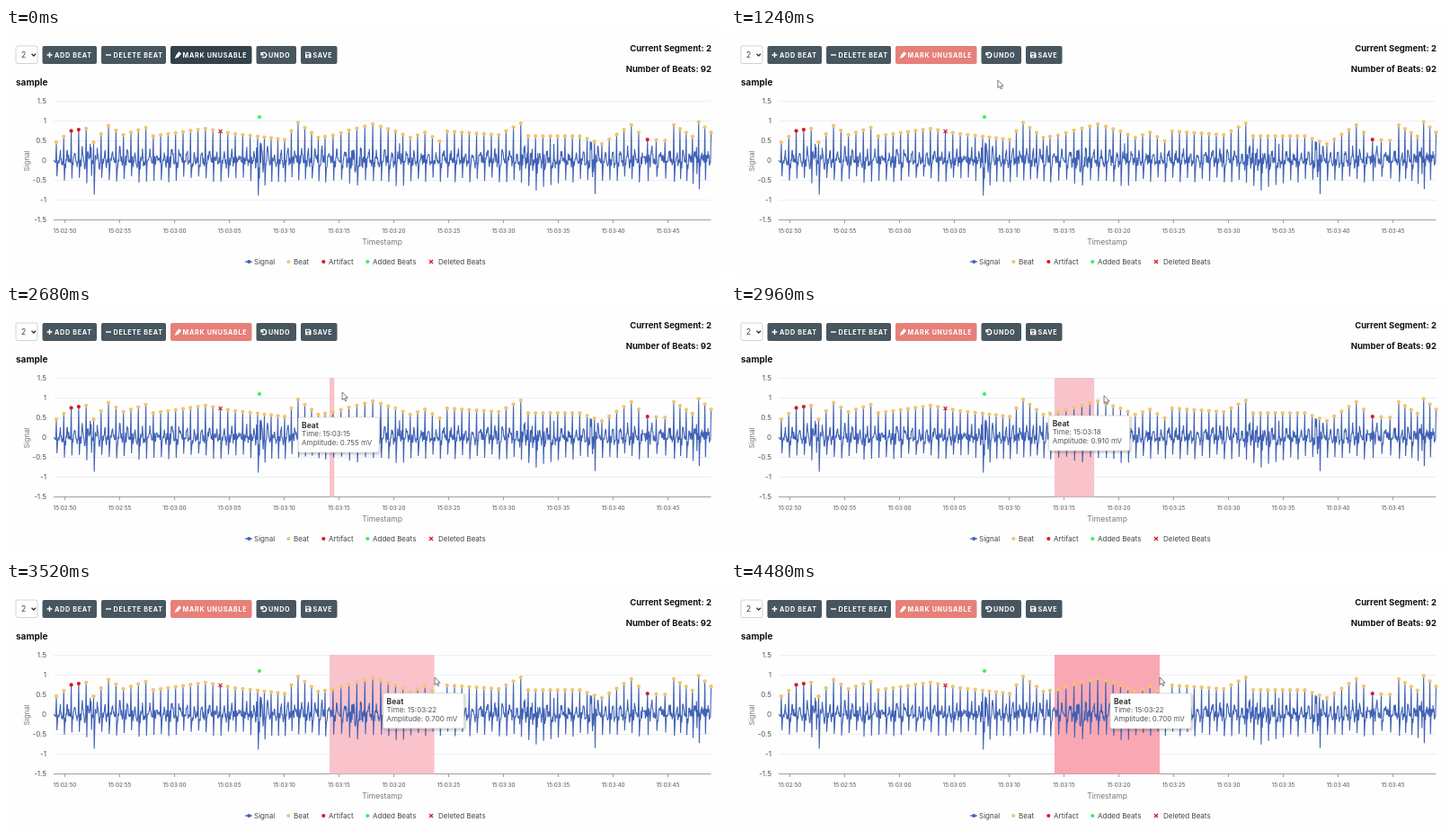
These frames come from a looping animation (800x277 px, 4520 ms). An HTML page:

```html
<!DOCTYPE html>
<html lang="en">
<head>
<meta charset="utf-8">
<title>Beat editor</title>
<style>
html, body { margin: 0; width: 100%; height: 100%; overflow: hidden; background: #fefefe; }
svg { display: block; width: 100vw; height: 100vh; font: 8px Inter, sans-serif; }
text { dominant-baseline: central; }
.bold { font-weight: 700; }
.button { font-size: 7.2px; font-weight: 700; letter-spacing: .7px; fill: #fff; }
.icon { fill: none; stroke: #fff; stroke-width: 1.4; }
.solid { fill: #fff; fill-rule: evenodd; }
</style>
</head>
<body>
<svg id="stage" viewBox="0 0 800 277">
  <defs>
    <filter id="shadow" x="-20%" y="-30%" width="140%" height="170%">
      <feDropShadow dx="1" dy="1.5" stdDeviation="1.8" flood-opacity=".3"/>
    </filter>
  </defs>
  <g id="toolbar"></g>
  <g id="axes"></g>
  <rect id="area" x="360" y="81" height="132.5"/>
  <path id="signal" fill="none" stroke="#4062b5" stroke-width="1.1" stroke-linejoin="bevel"/>
  <g id="marks"></g>
  <g id="legend"></g>
  <g id="tip">
    <rect x="-45" width="90" height="39" rx="2" fill="#fff" stroke="#ccc" stroke-width=".6" filter="url(#shadow)"/>
    <g fill="#555">
      <text x="-41" y="8.7" class="bold" font-size="8.5" fill="#333">Beat</text>
      <text id="tipTime" x="-41" y="18.2"></text>
      <text id="tipAmp" x="-41" y="27.7"></text>
    </g>
  </g>
  <path id="cursor" d="M0 0V8.6L2 6.8L3.4 9.8L4.8 9.1L3.4 6.2H6.1Z" fill="#fff" stroke="#444" stroke-width=".7"/>
</svg>
<script>
const LOOP = 4520, ZERO = 147, UNIT = 44, LEFT = 53, RIGHT = 784.5;
const BLUE = '#4062b5', YELLOW = '#f0c56c', RED = '#dc1820', GREEN = '#38ef5c', SLATE = '#47565f';
const $ = id => document.getElementById(id);

function add(parent, tag, attrs, label) {
  const el = document.createElementNS('http://www.w3.org/2000/svg', tag);
  for (const key in attrs) el.setAttribute(key, attrs[key]);
  if (label) el.textContent = label;
  return $(parent).appendChild(el);
}
const text = (parent, x, y, label, attrs) => add(parent, 'text', { x, y, ...attrs }, label);

// Linear interpolation through [position, ...values] keys.
function along(keys, p) {
  let i = 1;
  while (i < keys.length - 1 && p > keys[i][0]) i++;
  const [a, ...from] = keys[i - 1], [b, ...to] = keys[i];
  const k = Math.min(1, Math.max(0, (p - a) / (b - a)));
  return from.map((v, j) => v + (to[j] - v) * k);
}

function clock(x) {
  const s = 50 + (x - 65.5) / 12.2;
  return `15:0${2 + Math.floor(s / 60)}:${String(Math.floor(s % 60)).padStart(2, '0')}`;
}

// Toolbar
add('toolbar', 'rect', { x: 11, y: 20, width: 24, height: 19.5, rx: 2, fill: '#fff', stroke: '#c4c8cc', 'stroke-width': .8 });
text('toolbar', 17, 30, '2', { fill: '#444', 'font-size': 8.5 });
add('toolbar', 'path', { d: 'M28.5 28.7l2.3 2.3l2.3-2.3', fill: 'none', stroke: '#333', 'stroke-width': 1.3 });

let left = 40.5;
const buttons = [
  ['ADD BEAT', 60.5, 'icon', 'M-3 0h6M0-3v6'],
  ['DELETE BEAT', 72, 'icon', 'M-3 0h6'],
  ['MARK UNUSABLE', 90.5, 'solid', 'M-3 3.5l1-3l3.5-4.3l2.7 2.2l-3.7 4.3l-2 .5l-.7.8z'],
  ['UNDO', 44.5, 'icon', 'M-2.5-3v2.7h2.7M-2.2-.7a2.8 2.8 0 1 1 .7 2.8'],
  ['SAVE', 40.5, 'solid', 'M-3-3.2h5l1.5 1.5v5h-6.5zM-2-2.2v1.8h3.6v-1.8zM.2.6a1 1 0 1 0 .01 0z']
].map(([label, width, kind, d]) => {
  const box = add('toolbar', 'rect', { x: left, y: 20, width, height: 20, rx: 2, fill: SLATE });
  add('toolbar', 'path', { d, class: kind, transform: `translate(${left + 8} 30)` });
  text('toolbar', left + 13.5, 30, label, { class: 'button' });
  left += width + 5;
  return box;
});

const heading = { class: 'bold', fill: '#111', 'font-size': 9.5 };
text('toolbar', 785, 22.4, 'Current Segment: 2', { ...heading, 'text-anchor': 'end' });
text('toolbar', 785, 45.8, 'Number of Beats: 92', { ...heading, 'text-anchor': 'end' });
text('toolbar', 11, 59.7, 'sample', { ...heading, 'font-size': 10 });

// Axes
const line = (d, stroke) => add('axes', 'path', { d, stroke, 'stroke-width': .8 });
for (let v = 1.5; v >= -1.5; v -= .5) {
  const y = ZERO + .5 - v * UNIT;
  line(`M${LEFT} ${y}H${RIGHT}`, v > -1.5 ? '#e9ebf1' : '#85888f');
  text('axes', 45, y - .5, String(v), { fill: '#555', 'text-anchor': 'end' });
}
for (let x = 65.5; x < RIGHT; x += 61) {
  line(`M${x} 213.5v3.5`, '#85888f');
  text('axes', x, 225.6, clock(x + .1), { fill: '#555', 'font-size': 6.4, 'text-anchor': 'middle' });
}
const axisName = { fill: '#777', 'text-anchor': 'middle' };
text('axes', 418.5, 238, 'Timestamp', { ...axisName, 'font-size': 8.5 });
text('axes', 0, 0, 'Signal', { ...axisName, transform: 'translate(23 148) rotate(-90)' });

// Beats: a heart rate and an envelope in mV, both by beat index
const places = [[0, 56], [27, 280], [37, 355], [44, 417], [79, 704], [83, 743], [89, 784.5]];
const envelope = [
  [0, .45], [2, .74], [4, .8], [5, .45], [7, .87], [9, .64], [12, .82], [13, .61], [20, .8],
  [24, .66], [31, .52], [33, .95], [36, .57], [38, .627], [40, .755], [43, .91], [46, .729],
  [48, .57], [50, .7], [52, .48], [53, .73], [60, .64], [63, .93], [64, .61], [71, .61],
  [74, .41], [78, .89], [80, .52], [82, .5], [83, .89], [86, .6], [87, .97], [89, .7]
];
const beats = Array.from({ length: 90 }, (_, i) => {
  const [x] = along(places, i), [mv] = along(envelope, i);
  return { x, mv, y: ZERO - mv * UNIT };
});

// Signal: spike, dip, then a noisy rest with a soft hump
let seed = 7;
const random = () => (seed = (seed * 16807) % 2147483647) / 2147483647;
const bursts = [[95, 4, 20], [282, 4, 26], [392, 9, 8], [438, 5, 9], [591, 17, 9], [653, 4, 16], [771, 6, 12]];
const unrest = x => bursts.reduce((sum, [c, w, a]) => sum + a * Math.exp(-(((x - c) / w) ** 2)), 0);

let d = `M${LEFT} ${ZERO}`;
const to = (x, y) => { if (x <= RIGHT) d += `L${x.toFixed(1)} ${y.toFixed(1)}`; };
beats.forEach(({ x, y }, i) => {
  const gap = i < 89 ? beats[i + 1].x - x : 0;
  to(x - .7, 150);
  to(x, y + 1);
  to(x + .7, 165 + 7 * random() + unrest(x));
  for (let s = 1.5; s < gap - 1; s += .5) {
    const hump = 11 * Math.exp(-(((s / gap - .5) / .12) ** 2));
    to(x + s, ZERO + 2 - hump + (random() + random() - 1) * (9 + unrest(x + s)));
  }
});
$('signal').setAttribute('d', d);

const dot = (parent, cx, cy, fill) => add(parent, 'circle', { cx, cy, r: 2.1, fill });
const cross = (parent, x, y) => add(parent, 'path', { d: `M${x - 2} ${y - 2}l4 4m0-4l-4 4`, stroke: RED, 'stroke-width': 1.3 });
const artifacts = [2, 3, 80], deleted = 22;
beats.forEach(({ x, y }, i) => {
  if (i === deleted) cross('marks', x, y);
  else dot('marks', x, y, artifacts.includes(i) ? RED : YELLOW);
});
dot('marks', 282, 99, GREEN);

// Legend
add('legend', 'path', { d: 'M266 260h8', stroke: BLUE, 'stroke-width': 1.2 });
[[276, 'Signal', BLUE], [320, 'Beat', YELLOW], [359, 'Artifact', RED],
 [408, 'Added Beats', GREEN], [481, 'Deleted Beats']].forEach(([x, label, fill]) => {
  if (fill) dot('legend', x - 5.7, 260, fill);
  else cross('legend', x - 8, 260);
  text('legend', x, 260.2, label, { fill: '#444' });
});

// Motion: keys are [time, x, y]; the selection edge trails the cursor
const cursorPath = [[1100, 262, 38], [1500, 361, 95], [2570, 361, 95], [2680, 374, 97], [3200, 450, 104], [3450, 477, 106]];
const tipPath = [[2600, 362.5, 128], [2680, 370, 125], [3200, 423, 121.5], [3540, 467, 124]];
const EDGE_LAG = 75, TIP_LAG = 90;

const show = (id, on) => $(id).setAttribute('visibility', on ? 'visible' : 'hidden');
const move = (id, [x, y]) => $(id).setAttribute('transform', `translate(${x} ${y})`);

function draw(t) {
  buttons[2].setAttribute('fill', t < 800 ? '#34414a' : '#e68079');

  const dragging = t >= 2600 && t < 3720, marked = t >= 4160;
  show('area', dragging || marked);
  $('area').setAttribute('width', Math.max(0, along(cursorPath, t - EDGE_LAG)[0] - 360));
  $('area').setAttribute('fill', marked ? '#f9a8b3' : '#fac2ca');

  show('cursor', t >= 1100);
  move('cursor', along(cursorPath, t));

  show('tip', t >= 1460);
  move('tip', along(tipPath, t));
  const [aim] = along(tipPath, t + TIP_LAG);
  const beat = beats.reduce((a, b) => Math.abs(b.x - aim) < Math.abs(a.x - aim) ? b : a);
  $('tipTime').textContent = 'Time: ' + clock(beat.x);
  $('tipAmp').textContent = `Amplitude: ${beat.mv.toFixed(3)} mV`;
}

const start = performance.now();
function tick() {
  draw((performance.now() - start) % LOOP);
  requestAnimationFrame(tick);
}
tick();
</script>
</body>
</html>
```
